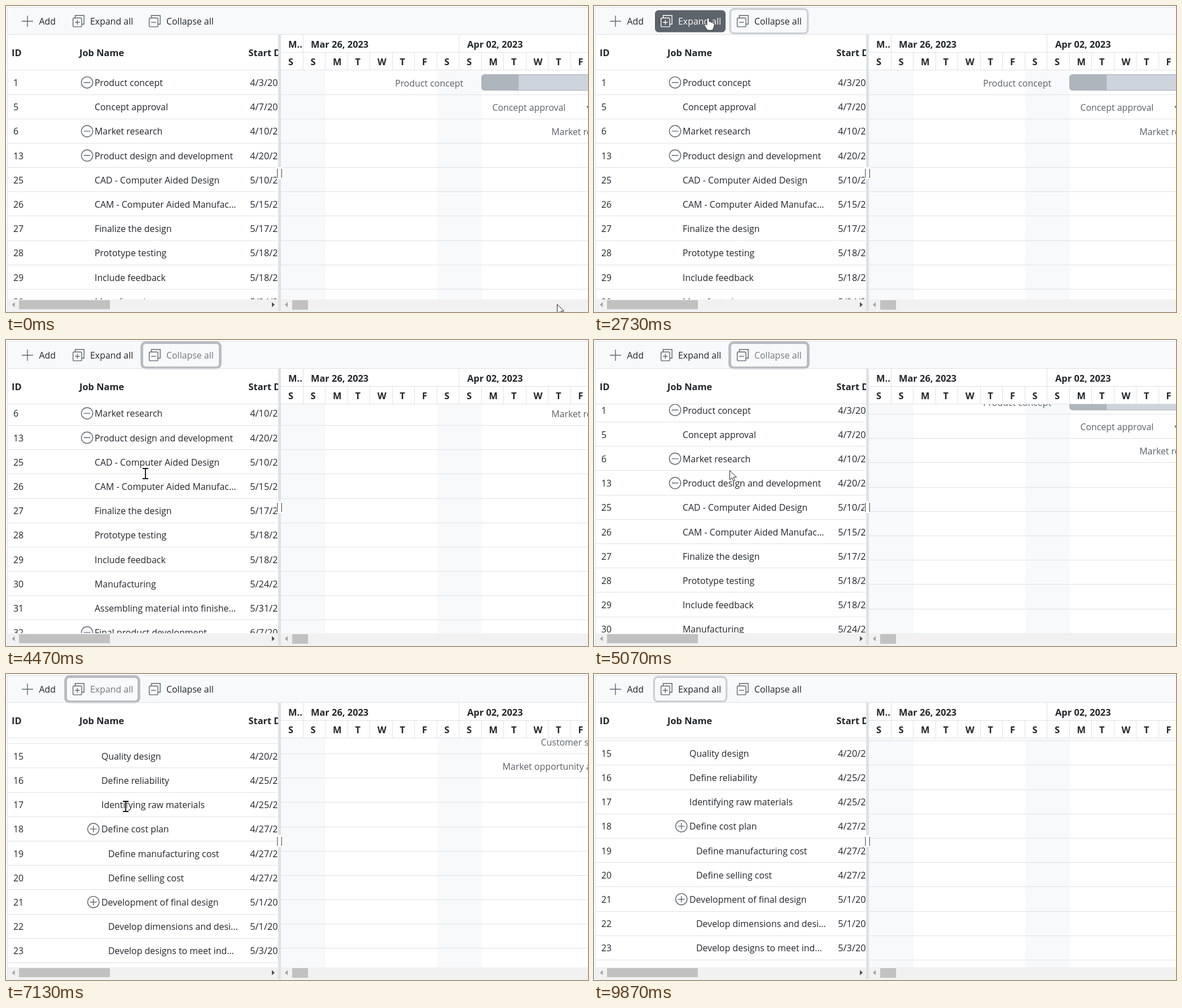
An HTML page with a canvas for the animation above (9.94 s loop, 1031 by 543 pixels).

```html
<!DOCTYPE html>
<html lang="en">
<head>
<meta charset="utf-8">
<title>Project schedule</title>
<style>
html, body { margin: 0; width: 100%; height: 100%; overflow: hidden; background: #fff; }
canvas { display: block; }
</style>
</head>
<body>
<canvas id="stage" width="1031" height="543"></canvas>
<script>
const ctx = document.getElementById('stage').getContext('2d');
const LOOP = 9940, STEP = 200 / 3;
const W = 1031, ROW = 43.2, TOP = 113.3, BODY_END = 520.5, DAY = 39.5, APRIL_3 = 842.3;
const GRID_W = 478;
const LINE = '#dee2e6', PALE = '#f8f9fa', INK = '#212529', GREY = '#6c757d', ICON = '#5f676e', BLUE = '#0d6efd';
const FAMILY = '"Open Sans", "Noto Sans", sans-serif';
const BODY_FONT = '15.9px ' + FAMILY;
const DATE_FONT = '16.3px ' + FAMILY;
const HEAD_FONT = 'bold 16.4px ' + FAMILY;

// id | level | kind (p parent, m milestone) | name | start | days
const tasks = `1|0|p|Product concept|4/3|5
2|1||Defining the product usage|4/3|3
3|1||Defining the target audience|4/3|3
4|1||Prepare product sketch and no...|4/6|2
5|0|m|Concept approval|4/7|0
6|0|p|Market research|4/10|9
7|1|p|Demand analysis|4/10|4
8|2||Customer strength|4/10|4
9|2||Market opportunity analysis|4/10|4
10|1||Competitor analysis|4/14|4
11|1||Product strength analysis|4/18|2
12|1|m|Research complete|4/20|0
13|0|p|Product design and development|4/20|14
14|1||Functionality design|4/20|3
15|1||Quality design|4/20|3
16|1||Define reliability|4/25|2
17|1||Identifying raw materials|4/25|2
18|1|p|Define cost plan|4/27|2
19|2||Define manufacturing cost|4/27|2
20|2||Define selling cost|4/27|2
21|1|p|Development of final design|5/1|7
22|2||Develop dimensions and desi...|5/1|2
23|2||Develop designs to meet ind...|5/3|2
24|2||Include all the details|5/5|3
25|0||CAD - Computer Aided Design|5/10|3
26|0||CAM - Computer Aided Manufac...|5/15|2
27|0||Finalize the design|5/17|2
28|0||Prototype testing|5/18|4
29|0||Include feedback|5/18|4
30|0||Manufacturing|5/24|5
31|0||Assembling material into finishe...|5/31|5
32|0|p|Final product development|6/7|9`.split('\n').map(line => {
  const [id, level, kind, name, start, days] = line.split('|');
  const [month, day] = start.split('/').map(Number);
  const offset = (Date.UTC(2023, month - 1, day) - Date.UTC(2023, 3, 3)) / 864e5;
  return { id, level: +level, kind, name, date: start + '/2023', x: APRIL_3 + offset * DAY, days: +days };
});
const topLevel = tasks.filter(task => task.level === 0);

// time, x, y, shape used from that time on
const pointer = [
  [0, 976, 529, 'arrow'], [400, 570, 270, 'arrow'], [667, 330, 42, 'hand'], [800, 306, 24, 'hand'],
  [933, 306, 24, 'hand'], [1200, 300, 31, 'hand'], [2133, 300, 31, 'hand'], [2467, 203, 24, 'hand'],
  [2733, 202, 21, 'hand'], [3333, 202, 21, 'hand'], [3733, 300, 24, 'hand'], [4067, 300, 24, 'hand'],
  [4133, 285, 60, 'arrow'], [4267, 247, 237, 'beam'], [4867, 247, 237, 'beam'], [5067, 240, 231, 'arrow'],
  [5133, 234, 222, 'arrow'], [5200, 234, 222, 'arrow'], [5333, 217, 217, 'arrow'], [5467, 217, 217, 'arrow'],
  [5733, 185, 30, 'hand'], [5867, 168, 18, 'hand'], [6133, 168, 18, 'arrow'], [6467, 168, 18, 'arrow'],
  [6667, 200, 170, 'beam'], [6800, 212, 235, 'beam'], [7267, 212, 235, 'beam'], [7400, 310, 125, 'arrow'],
  [7467, 364, 62, 'arrow'], [7533, 0, 0, ''], [7933, 310, 22, 'hand'], [8000, 232, 508, 'arrow'], [8067, 0, 0, '']
];
const gridScroll = [
  [0, 0], [4333, 14], [4400, 52], [4467, 92], [4533, 114], [4600, 120], [4933, 74], [5000, 25.5],
  [5067, 11.5], [5133, 0], [6933, 30], [7000, 145], [7067, 318], [7133, 595], [7200, 600]
];

const buttons = {
  expand: {
    x: 108, w: 125, label: 'Expand all', textX: 149, plus: true,
    hover: [[2400, 3533], [5733, 6200]], faint: [[6200, 6400]],
    ring: [[2867, 3933, 1], [6400, 9800, 1], [9800, 9867, .7], [9867, LOOP, .4]]
  },
  collapse: {
    x: 243, w: 134, label: 'Collapse all', textX: 284, plus: false,
    hover: [[667, 2333], [3600, 4133], [7933, 8000]], faint: [[6000, 6533], [8000, 8067]],
    ring: [[1400, 2333, 1], [2333, 2867, .4], [3867, 6000, 1]]
  }
};
const spinning = [[1467, 1867], [2867, 3067], [3933, 4067], [6133, 6467]];
const gridExpanded = [[2933, 4000], [6267, LOOP]];
const chartExpanded = [[3000, 4000], [6467, LOOP]];

const active = (spans, t) => spans.find(([from, to]) => t >= from - 5 && t < to - 5);
const lastKey = (keys, t) => keys.filter(key => key[0] <= t + 5).pop();

function rect(x, y, w, h, color) {
  ctx.fillStyle = color;
  ctx.fillRect(x, y, w, h);
}
function text(str, x, y, color = INK, font = BODY_FONT, align = 'left') {
  ctx.font = font;
  ctx.textAlign = align;
  ctx.fillStyle = color;
  ctx.fillText(str, x, y);
}
function stroke(color, width, ...paths) {
  ctx.strokeStyle = color;
  ctx.lineWidth = width;
  ctx.beginPath();
  for (const path of paths) path.forEach(([x, y], i) => i ? ctx.lineTo(x, y) : ctx.moveTo(x, y));
  ctx.stroke();
}
function polygon(points, fill, line) {
  ctx.beginPath();
  points.forEach(([x, y]) => ctx.lineTo(x, y));
  ctx.closePath();
  ctx.fillStyle = fill;
  ctx.fill();
  if (line) {
    ctx.strokeStyle = line;
    ctx.lineWidth = 1;
    ctx.stroke();
  }
}
function rounded(x, y, w, h, r, fill, line, width = 1) {
  ctx.beginPath();
  ctx.roundRect(x, y, w, h, r);
  if (fill) { ctx.fillStyle = fill; ctx.fill(); }
  if (line) { ctx.strokeStyle = line; ctx.lineWidth = width; ctx.stroke(); }
}
function clipped(x, y, w, h, draw) {
  ctx.save();
  ctx.beginPath();
  ctx.rect(x, y, w, h);
  ctx.clip();
  draw();
  ctx.restore();
}
function sign(x, y, arm, plus, color, width = 1.4) {
  stroke(color, width, [[x - arm, y], [x + arm, y]], plus ? [[x, y - arm], [x, y + arm]] : []);
}

function drawButton(button, t) {
  const { x, w } = button;
  const hover = active(button.hover, t), ring = active(button.ring, t), faint = active(button.faint, t);
  if (ring) {
    const strength = ring[2], spread = strength === 1 ? 4.8 : 3.4, inset = spread / 2;
    rounded(x - inset, 7 - inset, w + spread, 40 + spread, 7,
      null, `rgba(108,117,125,${strength === 1 ? .46 : .3})`, spread);
  }
  if (hover) rounded(x + .5, 8, w - 1, 38, 5.5, '#5c636a', '#565e64');
  else if (faint) rounded(x + .5, 8, w - 1, 38, 5.5, null, '#e9ecef');
  const dim = (ring && ring[2] === 1) || (faint && button.plus);
  const iconX = x + 10, color = hover ? '#fff' : ICON;
  rounded(iconX + .7, 21.3, 15.4, 15.6, 2, null, color, 1.4);
  stroke(color, 1.4, [[iconX + 4.6, 21], [iconX + 4.6, 16.7], [iconX + 20.2, 16.7],
    [iconX + 20.2, 32.2], [iconX + 16.2, 32.2]]);
  sign(iconX + 8.4, 29, 4.2, button.plus, color);
  text(button.label, button.textX, 33, hover ? '#fff' : dim ? '#73797f' : INK);
}

function drawToolbar(t) {
  rect(3, 2, W, 48.5, PALE);
  rect(2, 2, W, 1, LINE);
  sign(38, 27, 10, true, ICON);
  text('Add', 58.5, 33);
  drawButton(buttons.expand, t);
  drawButton(buttons.collapse, t);
}

function rowLines(x, w, scroll) {
  for (let y = TOP - scroll % ROW + ROW; y < BODY_END + ROW; y += ROW) rect(x, Math.round(y), w, 1, LINE);
}

function drawGrid(t) {
  const expanded = active(gridExpanded, t), scroll = lastKey(gridScroll, t)[1];
  clipped(3, 51, 479, 62, () => {
    text('ID', 10, 88.7, INK, HEAD_FONT);
    text('Job Name', 130, 88.7, INK, HEAD_FONT);
    text('Start Date', 429.5, 88.7, INK, HEAD_FONT);
  });
  clipped(3, 113, GRID_W, BODY_END - 113, () => {
    rowLines(3, GRID_W, scroll);
    (expanded ? tasks : topLevel).forEach((task, i) => {
      const y = TOP + ROW * i - scroll, indent = task.level * 12;
      if (y < 60 || y > BODY_END) return;
      text(task.id, 13, y + 28.7);
      text(task.name, 157 + indent, y + 28.7);
      text(task.date, 432.3, y + 28.7, INK, DATE_FONT);
      if (task.kind === 'p') {
        const x = (expanded ? 142.8 : 143.6) + indent;
        ctx.beginPath();
        ctx.arc(x, y + 22.4, 10.1, 0, 7);
        ctx.strokeStyle = ICON;
        ctx.lineWidth = 1.4;
        ctx.stroke();
        sign(x, y + 22.4, 5.8, expanded, ICON);
      }
    });
  });
  rect(3, 113, 479, 1, LINE);
}

function drawBar(task, y) {
  const label = task.name.replace('and no...', 'and notes');
  const milestone = task.kind === 'm';
  text(label, milestone ? task.x - 9 : task.x - 32.3, y + 29.2, '#5b6167', BODY_FONT, 'right');
  if (task.x > W) return;
  if (milestone) {
    const x = task.x + 40, mid = y + 22.5;
    polygon([[x - 12, mid], [x, mid - 12], [x + 12, mid], [x, mid + 12]], GREY);
    return;
  }
  const parent = task.kind === 'p', width = task.days * DAY, part = parent ? 1 / 3 : .3;
  ctx.save();
  rounded(task.x, y + 8.2, width, 28.2, 5, parent ? '#ced4dd' : '#86b7fe');
  ctx.clip();
  rect(task.x, y + 8, width * part, 29, parent ? '#adb5bd' : BLUE);
  ctx.restore();
  rounded(task.x + .5, y + 8.5, width - 1, 27.8, 5, null, parent ? '#a5adb6' : BLUE);
}

function drawChart(t) {
  // the chart trails the grid by one step after the first scroll
  const scroll = lastKey(gridScroll, t > 4900 ? t - STEP : t)[1];
  const rows = active(chartExpanded, t) ? tasks : topLevel;
  clipped(487, 113, W - 487, BODY_END - 113, () => {
    rect(487, 113, 79, 410, PALE);
    rect(764, 113, 79, 410, PALE);
    rowLines(487, W - 487, scroll);
    rows.forEach((task, i) => {
      const y = TOP + ROW * i - scroll;
      if (y > 50 && y < BODY_END) drawBar(task, y);
    });
  });
  rect(487, 82, W, 1, LINE);
  rect(487, 113, W, 1, LINE);
  [...'SSMTWTFSSMTWTF'].forEach((letter, i) => {
    const x = 486.9 + i * DAY;
    if (i) rect(Math.round(x - .5), 82, 1, 31, LINE);
    text(letter, x + 13.1, 104.8, INK, HEAD_FONT);
  });
  rect(526, 51, 1, 31, LINE);
  rect(802, 51, 1, 31, LINE);
  text('M..', 500, 73.8, INK, HEAD_FONT);
  text('Mar 26, 2023', 540, 73.8, INK, HEAD_FONT);
  text('Apr 02, 2023', 817, 73.8, INK, HEAD_FONT);
}

function scrollArrow(x, dir, color) {
  polygon([[x + dir * 2.5, 530], [x - dir * 2.5, 525.5], [x - dir * 2.5, 534.5]], color);
}
function drawFrame() {
  rect(3, 520.5, 479, 20, '#f1f1f1');
  rect(487, 520.5, W, 20, '#f1f1f1');
  rect(23, 522, 161, 16, '#c1c1c1');
  rect(507, 522, 28, 17, '#c1c1c1');
  scrollArrow(13, -1, '#a3a3a3');
  scrollArrow(473.5, 1, '#505050');
  scrollArrow(496.5, -1, '#a3a3a3');
  rect(2, 2, 1, 540, LINE);
  rect(2, 541, W, 1, LINE);
  rect(2, 50, W, 1, LINE);
  rect(482, 51, 5, 490, LINE);
  rect(479, 286, 11, 21, '#fff');
  rect(480, 289, 1.5, 16, GREY);
  rect(487.5, 289, 1.5, 16, GREY);
}

function drawSpinner(t) {
  if (!active(spinning, t)) return;
  const start = -.75 + (t - 6333) / 1000 * Math.PI * 2;
  ctx.beginPath();
  ctx.arc(463, 270, 16.3, start, start + 4.5);
  ctx.strokeStyle = BLUE;
  ctx.lineWidth = 3.6;
  ctx.stroke();
}

const shapes = {
  arrow() {
    polygon([[.5, .5], [.5, 17], [4.4, 13.4], [7, 19.5], [9.6, 18.4], [7, 12.5], [12.5, 12.3]], '#fff', '#222');
  },
  hand() {
    ctx.beginPath();
    ctx.moveTo(-2, 12);
    ctx.lineTo(-2, 2);
    ctx.quadraticCurveTo(0, -1.5, 2, 2);
    ctx.lineTo(2, 7);
    ctx.quadraticCurveTo(4, 5.5, 5.5, 8);
    ctx.quadraticCurveTo(8, 7, 8.5, 9.3);
    ctx.quadraticCurveTo(11, 8.5, 11, 11);
    ctx.lineTo(11, 15);
    ctx.lineTo(8, 22);
    ctx.lineTo(-1, 22);
    ctx.lineTo(-6.5, 13.5);
    ctx.quadraticCurveTo(-6, 10, -2, 13);
    ctx.closePath();
    ctx.fillStyle = '#fff';
    ctx.fill();
    ctx.strokeStyle = '#333';
    ctx.lineWidth = 1;
    ctx.stroke();
  },
  beam() {
    const outline = [[[-5, -9], [-1, -9], [0, -8], [1, -9], [5, -9]], [[0, -8], [0, 8]],
      [[-5, 9], [-1, 9], [0, 8], [1, 9], [5, 9]]];
    stroke('#fff', 3.4, ...outline);
    stroke('#111', 1.8, ...outline);
  }
};

function drawPointer(t) {
  const from = lastKey(pointer, t), to = pointer[pointer.indexOf(from) + 1];
  if (!from[3]) return;
  const part = to && to[3] ? Math.max(0, (t - from[0]) / (to[0] - from[0])) : 0;
  const at = i => Math.round(from[i] + (part ? (to[i] - from[i]) * part : 0));
  ctx.save();
  ctx.translate(at(1), at(2));
  shapes[from[3]]();
  ctx.restore();
}

function render(now) {
  const t = Math.floor((now % LOOP + 4) / STEP) * STEP;
  rect(0, 0, W, 543, '#fff');
  drawToolbar(t);
  drawGrid(t);
  drawChart(t);
  drawFrame();
  drawSpinner(t);
  drawPointer(t);
}

const begin = performance.now();
function tick() {
  render(performance.now() - begin);
  requestAnimationFrame(tick);
}
tick();
</script>
</body>
</html>
```
